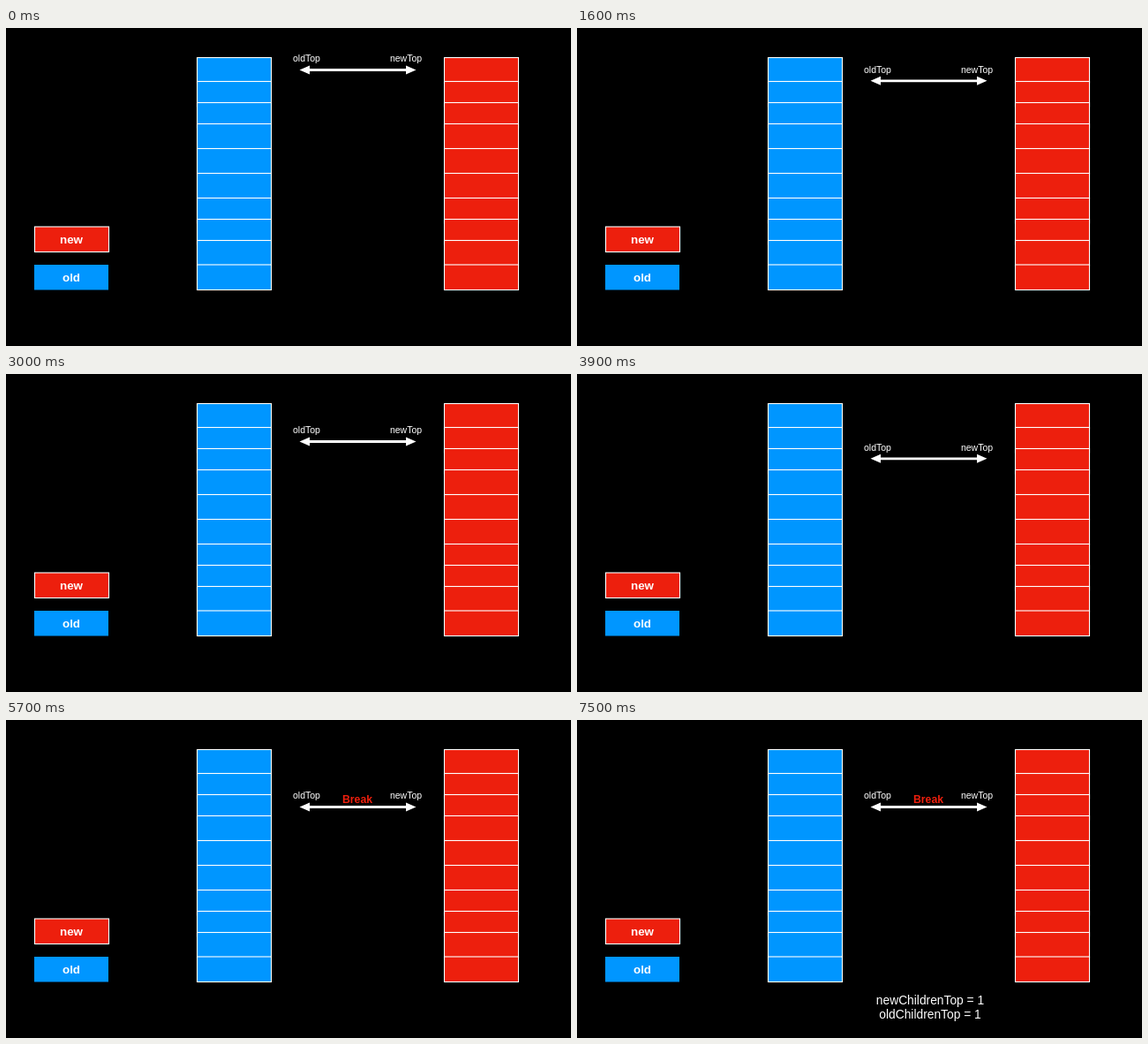
An HTML page for the animation above (7600 ms loop, 640x360 px).

```html
<!DOCTYPE html>
<html lang="en">
<head>
<meta charset="utf-8">
<title>Comparing two lists from the top</title>
<style>
html, body { margin: 0; width: 100%; height: 100%; overflow: hidden; background: #000; }
svg { display: block; width: 640px; height: 360px; }
text { font-family: "Liberation Sans", Arial, sans-serif; fill: #fff; text-anchor: middle; }
.label { font-size: 10.5px; }
.key { font-size: 13.4px; font-weight: bold; }
.break { font-size: 12.3px; font-weight: bold; fill: #ed1f0d; }
.result { font-size: 13.8px; }
.red { fill: #ed1f0d; }
.blue { fill: #0096ff; }
.edge { stroke: #fff; stroke-width: 1.1; }
</style>
</head>
<body>
<svg id="stage" viewBox="0 0 640 360">
  <rect class="red edge" x="32.5" y="225" width="84" height="28.5"/>
  <text class="key" x="74" y="244">new</text>
  <rect class="blue" x="32" y="268" width="84" height="28.5"/>
  <text class="key" x="74" y="287">old</text>
  <g id="rows"></g>
  <g id="arrow">
    <text class="label" x="340.5" y="-9.3">oldTop</text>
    <text class="label" x="453" y="-9.3">newTop</text>
    <path d="M342 0H455" stroke="#fff" stroke-width="2.8"/>
    <path d="M332.5 0l11.5 -5v10zM464.5 0l-11.5 -5v10z" fill="#fff"/>
  </g>
  <text id="stop" class="break" x="398" y="94">Break</text>
  <g id="result">
    <text class="result" x="400" y="322">newChildrenTop = 1</text>
    <text class="result" x="400" y="338">oldChildrenTop = 1</text>
  </g>
</svg>
<script>
const LOOP = 7600;
const ROW_TOPS = [33.5, 60.5, 84.5, 108.5, 136.5, 164.5, 192.5, 216.5, 240.5, 268];
const ROW_HEIGHT = 28.5;
const BLINK_STARTS = [100, 2103, 4106];
const BLINK_TIME = 450;
const MOVES = [
  { start: 1180, end: 2110, by: 29 },
  { start: 3183, end: 4110, by: 22 }
];

const byId = id => document.getElementById(id);
const rowLayer = byId("rows"), arrow = byId("arrow"), stop = byId("stop"), result = byId("result");

function addBox(parent, kind, x, y) {
  const box = document.createElementNS("http://www.w3.org/2000/svg", "rect");
  const attrs = { class: kind + " edge", x, y, width: 84, height: ROW_HEIGHT };
  for (const name in attrs) box.setAttribute(name, attrs[name]);
  parent.append(box);
  return box;
}

// Rows overlap slightly; later rows lie on top.
const rows = ROW_TOPS.map(y => [
  addBox(rowLayer, "blue", 216.5, y),
  addBox(rowLayer, "red", 496.5, y)
]);

const progress = (t, start, end) => Math.min(1, Math.max(0, (t - start) / (end - start)));
const ease = p => (1 - Math.cos(Math.PI * p)) / 2;

// Two full fades out and back in.
function blink(t, start) {
  const p = progress(t, start, start + 2 * BLINK_TIME);
  return (1 + Math.cos(4 * Math.PI * p)) / 2;
}

function draw(t) {
  BLINK_STARTS.forEach((start, i) => {
    for (const box of rows[i]) box.setAttribute("opacity", blink(t, start));
  });
  const y = MOVES.reduce((sum, m) => sum + m.by * ease(progress(t, m.start, m.end)), 47.5);
  arrow.setAttribute("transform", `translate(0 ${y})`);
  stop.setAttribute("opacity", progress(t, 5050, 5650));
  result.setAttribute("opacity", progress(t, 6050, 6750));
}

const origin = performance.now();
function tick() {
  draw((performance.now() - origin) % LOOP);
  requestAnimationFrame(tick);
}
tick();
</script>
</body>
</html>
```
